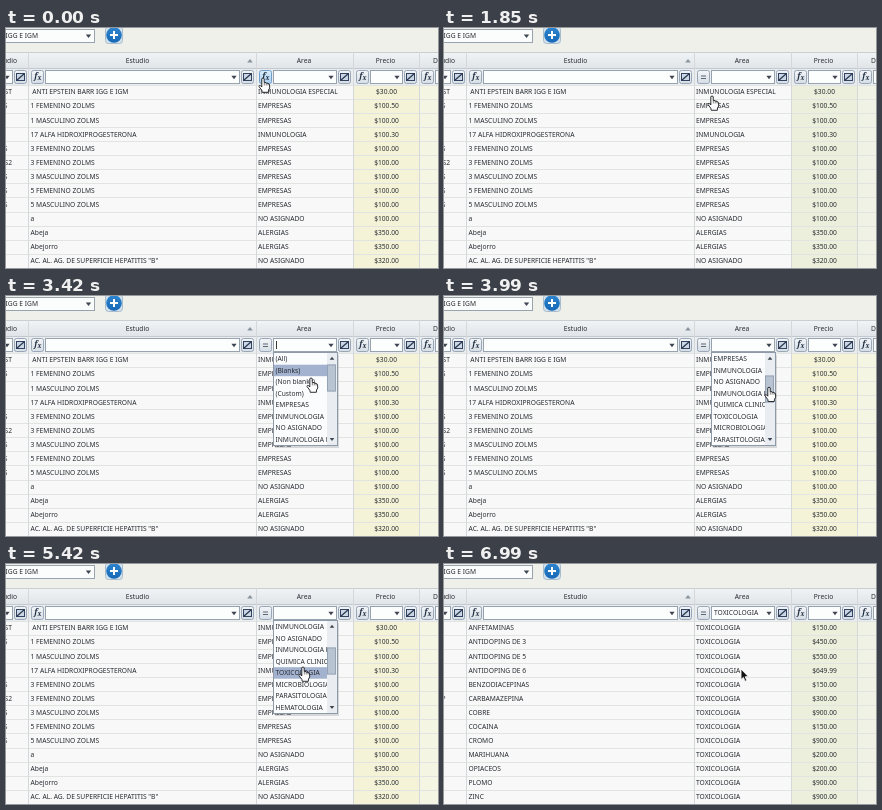
Write an HTML page with a canvas that moves like this. It is 432 px wide and 240 px high and loops after 7140 ms.

```html
<!DOCTYPE html>
<html lang="es">
<head>
<meta charset="utf-8">
<title>Estudios</title>
<style>
html, body { margin: 0; width: 100%; height: 100%; overflow: hidden; background: #eff0e9; }
canvas { display: block; width: 432px; height: 240px; }
</style>
</head>
<body>
<canvas id="stage"></canvas>
<script>
const canvas = document.getElementById('stage');
const ctx = canvas.getContext('2d');
const dpr = window.devicePixelRatio || 1;
canvas.width = 432 * dpr;
canvas.height = 240 * dpr;

const LOOP = 7140, STEP = LOOP / 50;
const MENU_OPEN = 420, MENU_CLOSE = 1270, LIST_OPEN = 2840, LIST_CLOSE = 5700, RELOAD = 6130;
const FONT = '6.7px "Noto Sans", "Open Sans", sans-serif';
const INK = '#292d33', LINE = '#d5d8da', BORDER = '#98a3b0';
const ROW_Y = 64, ROW_H = 14.06, ITEM_H = 11.5;

const studies = [
  ['ST', ' ANTI EPSTEIN BARR IGG E IGM', 'INMUNOLOGIA ESPECIAL', '30.00'],
  ['S', '1 FEMENINO ZOLMS', 'EMPRESAS', '100.50'],
  ['', '1 MASCULINO ZOLMS', 'EMPRESAS', '100.00'],
  ['', '17 ALFA HIDROXIPROGESTERONA', 'INMUNOLOGIA', '100.30'],
  ['S', '3 FEMENINO ZOLMS', 'EMPRESAS', '100.00'],
  ['S2', '3 FEMENINO ZOLMS', 'EMPRESAS', '100.00'],
  ['S', '3 MASCULINO ZOLMS', 'EMPRESAS', '100.00'],
  ['S', '5 FEMENINO ZOLMS', 'EMPRESAS', '100.00'],
  ['S', '5 MASCULINO ZOLMS', 'EMPRESAS', '100.00'],
  ['', 'a', 'NO ASIGNADO', '100.00'],
  ['', 'Abeja', 'ALERGIAS', '350.00'],
  ['', 'Abejorro', 'ALERGIAS', '350.00'],
  ['', 'AC. AL. AG. DE SUPERFICIE HEPATITIS "B"', 'NO ASIGNADO', '320.00']
];
const filtered = ('ANFETAMINAS 150.00|ANTIDOPING DE 3 450.00|ANTIDOPING DE 5 550.00|' +
  'ANTIDOPING DE 6 649.99|BENZODIACEPINAS 150.00|CARBAMAZEPINA 300.00|COBRE 900.00|' +
  'COCAINA 150.00|CROMO 900.00|MARIHUANA 200.00|OPIACEOS 200.00|PLOMO 900.00|ZINC 900.00')
  .split('|').map((s, i) => {
    const cut = s.lastIndexOf(' ');
    return [i === 5 ? 'P' : '', s.slice(0, cut), 'TOXICOLOGIA', s.slice(cut + 1)];
  });
const operators = ['Equals', 'Does not equals', 'Less than', 'Less than or equal to',
  'Greater than', 'Greater than or equal to', 'Like', 'Starts with', 'Contains',
  'Ends with', 'Does not start with', 'Does not end with', 'Does not contain'];
const areas = ['(All)', '(Blanks)', '(Non blanks)', '(Custom)', 'EMPRESAS', 'INMUNOLOGIA',
  'NO ASIGNADO', 'INMUNOLOGIA ESPECIAL', 'QUIMICA CLINICA', 'TOXICOLOGIA',
  'MICROBIOLOGIA', 'PARASITOLOGIA', 'HEMATOLOGIA', 'ALERGIAS'];

// [time, x, y] of the pointer tip
const path = [
  [0, 257, 50], [290, 257, 51], [850, 267.5, 68], [1140, 268, 68], [1850, 268, 68],
  [2420, 325, 47], [2860, 325, 48], [3420, 305, 82], [3710, 325, 80],
  [4140, 325, 95], [4570, 298, 85], [4860, 298, 88], [5420, 297, 103],
  [6420, 297, 103], [6990, 297, 105], [LOOP, 297, 105]
];

const ease = u => u * u * (3 - 2 * u);
const ramp = (t, a, b) => ease(Math.min(1, Math.max(0, (t - a) / (b - a))));
const within = (t, a, b) => t >= a && t < b;

function pointerAt(t) {
  let i = 1;
  while (i < path.length - 1 && path[i][0] < t) i++;
  const [a, b] = [path[i - 1], path[i]];
  const u = ramp(t, a[0], b[0]);
  return [a[1] + (b[1] - a[1]) * u, a[2] + (b[2] - a[2]) * u];
}

function rect(x, y, w, h, fill, stroke) {
  ctx.fillStyle = fill;
  ctx.fillRect(x, y, w, h);
  if (stroke) {
    ctx.strokeStyle = stroke;
    ctx.lineWidth = 1;
    ctx.strokeRect(x + .5, y + .5, w - 1, h - 1);
  }
}

function rounded(x, y, w, h, r, fill, stroke) {
  ctx.beginPath();
  ctx.roundRect(x, y, w, h, r);
  ctx.fillStyle = fill;
  ctx.fill();
  ctx.strokeStyle = stroke;
  ctx.lineWidth = 1;
  ctx.stroke();
}

function gradient(x1, y1, x2, y2, from, to) {
  const g = ctx.createLinearGradient(x1, y1, x2, y2);
  g.addColorStop(0, from);
  g.addColorStop(1, to);
  return g;
}
const fade = (y, h, top, bottom) => gradient(0, y, 0, y + h, top, bottom);

function text(s, x, y, align = 'left', color = INK, font = FONT) {
  ctx.font = font;
  ctx.textAlign = align;
  ctx.fillStyle = color;
  ctx.fillText(s, x, y + 2.4);
}

function poly(points, fill, stroke) {
  ctx.beginPath();
  points.forEach(([x, y]) => ctx.lineTo(x, y));
  ctx.closePath();
  ctx.fillStyle = fill;
  ctx.fill();
  if (stroke) {
    ctx.strokeStyle = stroke;
    ctx.lineWidth = .9;
    ctx.lineJoin = 'round';
    ctx.stroke();
  }
}

function line(x1, y1, x2, y2, color, width = 1) {
  ctx.strokeStyle = color;
  ctx.lineWidth = width;
  ctx.beginPath();
  ctx.moveTo(x1, y1);
  ctx.lineTo(x2, y2);
  ctx.stroke();
}

const triangle = (x, y, r, dir, color = '#3c4550') =>
  poly([[x - r, y - dir * r * .55], [x + r, y - dir * r * .55], [x, y + dir * r * .75]], color);

function clipped(x, y, w, h, draw) {
  ctx.save();
  ctx.beginPath();
  ctx.rect(x, y, w, h);
  ctx.clip();
  draw();
  ctx.restore();
}

function toolbar() {
  rect(-4, 1, 93, 14, '#fbfcfc', BORDER);
  text('IGG E IGM', 32, 8, 'right');
  triangle(82.5, 8, 2.7, 1);
  rounded(99.5, -1.5, 17, 17, 3, '#d3e1ec', '#a9bccd');
  ctx.beginPath();
  ctx.arc(108, 7, 7.8, 0, Math.PI * 2);
  ctx.fillStyle = fade(-1, 16, '#2f86d0', '#1467b5');
  ctx.fill();
  rect(104, 6, 8, 2, '#fff');
  rect(107, 3, 2, 8, '#fff');
}

function header() {
  rect(0, 24, 432, 17, fade(24, 17, '#f2f4f5', '#dfe4e8'));
  line(0, 24.5, 432, 24.5, '#c9ced2');
  line(0, 40.5, 432, 40.5, '#c3c9ce');
  text('Estudio', 11, 33, 'right');
  text('Estudio', 131.5, 33, 'center');
  text('Area', 298, 33, 'center');
  text('Precio', 379.5, 33, 'center');
  text('Descuento', 427, 33);
  triangle(244, 33, 2.8, -1, '#8a949e');
}

function button(x, hot) {
  rounded(x + .5, 42.5, 12, 13, 2,
    hot ? fade(42, 13, '#dceefb', '#a9cfee') : fade(42, 13, '#f5f7f9', '#d6dee6'),
    hot ? '#6f9fca' : '#98a6b6');
}

function filterIcon(x) {
  button(x);
  rect(x + 2, 45, 9, 8, '#ccd7e5', '#33435f');
  line(x + 2.5, 52.5, x + 10.5, 45.5, '#28364e', 1.2);
}

function filterCell(x, end, sign, hot, arrowHot) {
  button(x, hot);
  if (sign) {
    rect(x + 4, 47.5, 5, 1, '#5d6875');
    rect(x + 4, 50, 5, 1, '#5d6875');
  } else {
    text('f', x + 4.8, 48.6, 'center', '#1f2c40', 'italic bold 8px "Noto Serif", serif');
    text('x', x + 8.4, 49.4, 'center', '#1f2c40', 'italic bold 6.5px "Noto Serif", serif');
  }
  rect(x + 14, 42, end - x - 14, 14, '#fcfdfd', BORDER);
  if (arrowHot) rect(end - 11, 43, 10, 12, fade(43, 12, '#d8ebfa', '#9fc8ea'), '#79a9d2');
  triangle(end - 6, 49.3, 2.6, 1);
  filterIcon(end + 1);
}

function filterRow(t) {
  rect(0, 41, 432, 16, '#eaedef');
  rect(-10, 42, 17, 14, '#fcfdfd', BORDER);
  triangle(1, 49.3, 2.6, 1);
  filterIcon(8);
  filterCell(25, 234);
  filterCell(253, 331, t >= MENU_CLOSE, t < 700, within(t, 2270, LIST_OPEN));
  filterCell(350, 397);
  filterCell(415, 470);
  if (t >= LIST_CLOSE) text('TOXICOLOGIA', 270, 49);
}

function grid(t) {
  const warm = t < MENU_CLOSE || within(t, LIST_OPEN, LIST_CLOSE);
  rect(0, 57, 432, 183, '#f7f8f7');
  rect(348, 57, 65, 183, warm ? '#f5f3d7' : '#ecefdb');
  rect(413, 57, 19, 183, warm ? '#f5f5e4' : '#f1f2e6');
  for (let i = 0; i <= 13; i++) {
    const y = Math.round(57 + i * ROW_H) + .5;
    line(0, y, 432, y, '#e2e4e2');
  }
  (t >= RELOAD ? filtered : studies).forEach(([code, name, area, price], i) => {
    const y = ROW_Y + i * ROW_H;
    text(code, code.length > 1 ? 6 : 1.5, y, 'right');
    text(name, 24.5, y);
    text(area, 252, y);
    text('$' + price, 380.5, y, 'center');
  });
  [22.5, 250.5, 347.5, 413.5].forEach(x => line(x, 24, x, 240, LINE));
}

function operatorMenu(hover) {
  rect(254, 58, 105, 184, 'rgba(60,70,80,.2)');
  rect(252, 56, 105, 190, '#e8eef1', '#6f8fbd');
  rect(253, 57, 14, 184, gradient(253, 0, 267, 0, '#d6e5f7', '#83a8d8'));
  if (hover) rect(252, 57, 105, 16, fade(57, 16, '#ffedc4', '#fbd990'), '#27346b');
  operators.forEach((label, i) => {
    const y = 65 + i * 14.05;
    text(label, 273, y);
    if (i < 7) {
      text('=≠<≤>≥*'[i], 258.5, y + (i === 6 ? 1 : 0), 'center', '#27405f',
        'bold 7.5px "DejaVu Sans", sans-serif');
      return;
    }
    rect(254, y - 4, 9, 8, '#dce9f7', '#35598c');
    if (i === 8 || i === 12) rect(256, y - 2, 5, 4, '#1f5c9f');
    else text('A', i === 7 || i === 10 ? 257.5 : 259.5, y, 'center', '#1f446f', 'bold 6px "Noto Sans", sans-serif');
    if (i > 9) line(254.5, y + 3.5, 262.5, y - 3.5, '#34435a', 1.1);
  });
}

function areaList(t) {
  const k = ramp(t, 3700, 4150);
  const first = Math.round(5 * k);
  const hover = t < 3100 ? -1 : t < 3560 ? 1 : t < 4420 ? -1 : t < 4850 ? 6
    : t < 5130 ? 7 : t < 5270 ? 8 : 9;
  rect(269, 59, 64, 93, 'rgba(60,70,80,.18)');
  rect(267, 56, 65, 94, '#fbfcfd', '#8f9aa8');
  clipped(268, 57, 53, 92, () => {
    for (let i = 0; i < 8; i++) {
      const y = 62.8 + i * ITEM_H, n = first + i;
      if (n === hover) rect(268, y - 5.6, 53, ITEM_H, '#a3b2cf');
      text(areas[n], 269.5, y);
    }
  });
  rect(321, 57, 10, 92, '#e9edf1');
  triangle(326, 62.5, 2.3, -1);
  triangle(326, 143.3, 2.3, 1);
  rect(321, 68.5 + 15 * k, 9, 27, '#b9c4d2', '#96a3b5');
}

function pointer(x, y, arrow) {
  ctx.save();
  ctx.translate(x, y);
  if (arrow) {
    poly([[0, 0], [0, 10.5], [2.4, 8.4], [4, 12.3], [5.8, 11.5], [4.2, 7.8], [7.3, 7.6]], '#111', '#f4f4f4');
  } else {
    poly([[-1.2, .6], [0, 0], [1.2, .6], [1.2, 4.6], [3, 4.5], [3.4, 5.2], [5, 5.2], [5.4, 6],
      [6.5, 6.4], [6.7, 10], [5.5, 12], [5.3, 14.3], [-.8, 14.3], [-1.2, 12.3],
      [-4, 8.6], [-3.6, 7.5], [-2.5, 7.6], [-1.2, 9]], '#fff', '#16181c');
    [1.3, 3.2, 5].forEach(dx => line(dx, 5, dx, 7.5, '#333', .6));
  }
  ctx.restore();
}

function draw(now) {
  // steps land slightly before their even spacing
  const t = Math.floor((now % LOOP) / STEP + .1) * STEP % LOOP;
  ctx.setTransform(dpr, 0, 0, dpr, 0, 0);
  rect(0, 0, 432, 240, '#eff0e9');
  toolbar();
  header();
  filterRow(t);
  grid(t);
  if (within(t, MENU_OPEN, MENU_CLOSE)) operatorMenu(t >= 700);
  if (within(t, LIST_OPEN, LIST_CLOSE)) areaList(t);
  if (within(t, LIST_OPEN, 3560)) line(270.5, 45, 270.5, 53, '#222', .9);
  pointer(...pointerAt(t), t >= 5990);
}

const start = performance.now();
function tick() {
  draw(performance.now() - start);
  requestAnimationFrame(tick);
}
tick();
</script>
</body>
</html>
```
